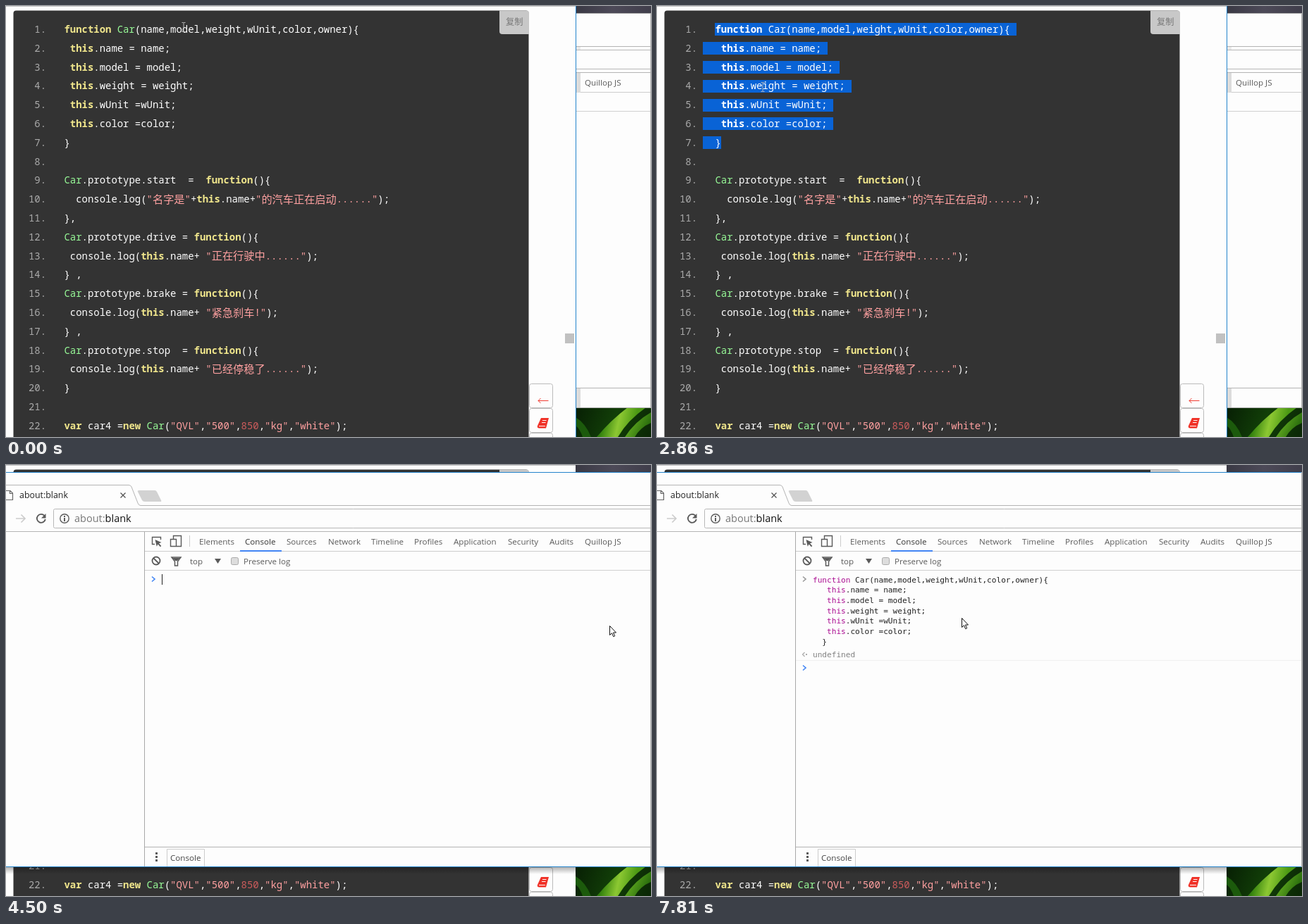
Write an HTML page with a canvas that moves like this. It is 915 by 612 pixels and loops after 8000 ms.

```html
<!DOCTYPE html>
<html lang="zh">
<head>
<meta charset="utf-8">
<title>Console paste</title>
<style>
html, body { margin: 0; width: 100%; height: 100%; overflow: hidden; background: #fff; }
canvas { display: block; }
</style>
</head>
<body>
<canvas id="stage" width="915" height="612"></canvas>
<script>
const ctx = document.getElementById('stage').getContext('2d');
const LOOP = 8000, SELECT = 1130, SELECTED = 2130, FRONT = 4500,
      MENU = 5330, PASTE = 6100, ENTER = 7250;
const CODE_X = 82.4, LINE = 26.8, CODE_SIZE = 13.96, CHAR = CODE_SIZE * .6;
const UI = '"Open Sans", "Noto Sans CJK SC", "Noto Sans CJK", sans-serif';
const CJK = '"Noto Sans CJK SC", "Noto Sans CJK", sans-serif';
const MONO = '"Noto Sans Mono", monospace';
const LOG = '"DejaVu Sans Mono", monospace';

const code = `function Car(name,model,weight,wUnit,color,owner){
 this.name = name;
 this.model = model;
 this.weight = weight;
 this.wUnit =wUnit;
 this.color =color;
}

Car.prototype.start  =  function(){
  console.log("名字是"+this.name+"的汽车正在启动......");
},
Car.prototype.drive = function(){
 console.log(this.name+ "正在行驶中......");
} ,
Car.prototype.brake = function(){
 console.log(this.name+ "紧急刹车!");
} ,
Car.prototype.stop  = function(){
 console.log(this.name+ "已经停稳了......");
}

var car4 =new Car("QVL","500",850,"kg","white");`.split('\n');

// Mouse moves: first step, last step, number of steps, destination
const moves = [
  [150, 540, 4, 87, 38],
  [1130, 1550, 4, 113, 159],
  [1690, 2130, 4, 118, 194],
  [2280, 2860, 5, 150, 115],
  [3140, 3420, 3, 718, 222],
  [3720, 4230, 5, 856, 228],
  [4640, 5050, 4, 382, 155],
  [5460, 5720, 3, 427, 211],
  [5840, 5970, 2, 432, 217]
];

function mouseAt(t) {
  let x = 252, y = 30;
  for (const [start, end, steps, toX, toY] of moves) {
    if (t < start) break;
    const gap = (end - start) / (steps - 1);
    const p = Math.min(steps, Math.floor((t - start) / gap + 1.001)) / steps;
    x += (toX - x) * p;
    y += (toY - y) * p;
  }
  return [x, y];
}

function box(color, x, y, w, h) {
  ctx.fillStyle = color;
  ctx.fillRect(x, y, w, h);
}

function path(d, fill, stroke, width = 1) {
  const p = new Path2D(d);
  if (fill) { ctx.fillStyle = fill; ctx.fill(p); }
  if (stroke) { ctx.strokeStyle = stroke; ctx.lineWidth = width; ctx.stroke(p); }
}

function round(x, y, w, h, r, fill, stroke) {
  ctx.beginPath();
  ctx.roundRect(x, y, w, h, r);
  if (fill) { ctx.fillStyle = fill; ctx.fill(); }
  if (stroke) { ctx.strokeStyle = stroke; ctx.lineWidth = 1; ctx.stroke(); }
}

function ring(x, y, r, color, width) {
  ctx.beginPath();
  ctx.arc(x, y, r, 0, 7);
  ctx.strokeStyle = color;
  ctx.lineWidth = width;
  ctx.stroke();
}

// Draws text and returns the x where it ends
function text(str, x, y, size, color, family = UI, weight = 400) {
  ctx.font = `${weight} ${size}px ${family}`;
  ctx.fillStyle = color;
  ctx.fillText(str, x, y);
  return x + ctx.measureText(str).width;
}

function textRight(str, x, y, ...style) {
  ctx.textAlign = 'right';
  text(str, x, y, ...style);
  ctx.textAlign = 'left';
}

function gradient(x0, y0, x1, y1, ...colors) {
  const g = ctx.createLinearGradient(x0, y0, x1, y1);
  colors.forEach((c, i) => g.addColorStop(i / (colors.length - 1), c));
  return g;
}

function codeLine(line, y, plain) {
  let x = CODE_X;
  for (const word of line.split(/("[^"]*"|\b(?:function|this|var|new|Car|850)\b)/)) {
    const key = /^(function|this|var|new)$/.test(word);
    const color = plain || (key ? '#f0e68c' : word === 'Car' ? '#98fb98' :
      word === '850' ? '#cd5c5c' : word[0] === '"' ? '#ffa0a0' : '#fff');
    for (const run of word.split(/([\u3000-\u9fff]+)/)) {
      x = run > '\u3000' ? text(run, x, y + .5, 15.2, color, CJK, 300)
                         : text(run, x, y, CODE_SIZE, color, MONO, key ? 700 : 500);
    }
  }
}

function selection(t) {
  const [x, y] = mouseAt(Math.min(t - 140, SELECTED));
  const last = Math.min(6, Math.floor((y - 19.6) / LINE));
  for (let i = 0; i <= last; i++) {
    const col = Math.max(0, Math.round((x - CODE_X) / CHAR));
    const end = i < last ? code[i].length + 1 : Math.min(code[i].length, col);
    const left = i ? 65 : 82, top = Math.ceil(24 + i * LINE);
    ctx.save();
    ctx.beginPath();
    ctx.rect(left, top, Math.ceil(CODE_X + end * CHAR) - left, 18);
    ctx.clip();
    box('#0963d6', 0, top, 742, 18);
    codeLine(code[i], 38 + i * LINE, '#fff');
    ctx.restore();
  }
}

function page(t) {
  box('#fdfdfd', 0, 0, 808, 612);
  round(10.5, 6.5, 731, 620, 4, '#333');
  code.forEach((line, i) => {
    const y = 38 + i * LINE;
    textRight(i + 1 + '.', 57, y, CODE_SIZE, '#aaa', MONO, 500);
    codeLine(line, y);
  });
  if (t >= SELECT) selection(t);
  round(700, 6.5, 42, 33.5, [0, 4, 0, 4], '#c8c8c8');
  text('复制', 709, 26.5, 12.2, '#777', CJK);
  for (const y of [536.5, 571.5, 606.5]) round(742.5, y, 33, 34, 3, '#fdfdfd', '#bbb');
  path('M769.5 560.5H755M758.5 557l-3.5 3.5 3.5 3.5', null, '#f03c32');
  path('M759 585H770L766 599.5H756Q753 599 754 596z', '#f03228');
  path('M761 588.5h5.5M760 591.5h5.5M756 596.5h9', null, '#fdfdfd');
  box('#c1c1c1', 793, 465, 13, 14);
  if (t < FRONT) {
    box('#eaeaea', 809, 58, 6, 4);
    box('#dcdcdc', 809, 95, 6, 28);
    box('#dcdcdc', 809, 543, 6, 27);
    box('#2484cc', 808, 0, 1, 612);
  }
  if (t >= 4100 && t < FRONT) {
    box('#fff', 764, 172, 80, 64);
    box('#ebebeb', 791, 173, 17, 63);
    box('#dfdfdf', 808, 173, 11, 63);
  }
}

function wallpaper() {
  box(gradient(808, 0, 915, 0, '#3a3944', '#4d4a58', '#403e4b'), 808, 0, 107, 11);
  ctx.save();
  ctx.beginPath();
  ctx.rect(808, 570, 107, 42);
  ctx.clip();
  box(gradient(808, 570, 915, 612, '#071f04', '#123f08', '#0a2605'), 808, 570, 107, 42);
  path('M808 584Q822 592 830 612H818Q814 600 808 596z', '#1c5a0c');
  path('M838 612Q858 588 882 570H908Q882 588 868 612z', gradient(846, 590, 890, 600, '#2f7d0c', '#8cc832', '#4c9a14'));
  path('M878 612Q892 590 915 577V592Q900 598 892 612z', gradient(880, 590, 908, 604, '#6cb424', '#286c0c'));
  ctx.restore();
}

function chevron(y, color) {
  path(`M207 ${y - 3.5}l4 3.5-4 3.5`, null, color, 1.6);
}

function caret(x, y) {
  box('#222', x, y, 1, 15);
}

function consoleBody(t) {
  const blue = '#4285f4';
  chevron(162, t < ENTER ? blue : '#999');
  if (t < PASTE) {
    if (t < 5050 || t >= MENU) caret(221, 155);
    return;
  }
  code.slice(0, 7).forEach((line, i) => {
    let x = 221;
    const indent = i ? '  ' : '';
    for (const word of (indent + line).split(/(function|this)/)) {
      const key = /^(function|this)$/.test(word);
      x = text(word, x, 166.5 + i * 14.7, 11.1, key ? '#aa0d91' : '#222', LOG);
    }
  });
  if (t < 6660) caret(241, 243);
  if (t < ENTER) return;
  path('M209.5 266l-3 3 3 3', null, '#aaa', 1.2);
  box('#aaa', 211, 268, 2, 2);
  text('undefined', 221, 273, 11.1, '#808080', LOG);
  box('#f0f0f0', 197, 277, 717, 1);
  chevron(288, blue);
  if (t < 7810) caret(221, 281);
}

function browser(t) {
  const edge = t < FRONT ? '#aaa' : '#2484cc', ink = '#5a5a5a';
  if (t >= FRONT) box(gradient(0, 571, 0, 581, 'rgba(0,0,0,.3)', 'rgba(0,0,0,0)'), 0, 571, 808, 10);
  box('#fdfdfd', 0, 10, 915, 561);
  box(edge, 0, 10, 915, 1);

  // Tab strip
  path('M0 28.5H174Q177 28.5 178 31L187 54Q188 57.5 191 57.5H915', null, '#b4b4b4');
  path('M0 36.5H6L9.5 40V49.5H0M5.5 36.5V40.5H9.5', null, '#666', 1.2);
  text('about:blank', 19, 47, 12.4, '#222');
  path('M162.5 39.5l7 7m0-7l-7 7', null, '#555', 1.3);
  path('M189 36H211Q213 36 214 38L220 50Q221 52 219 52H197Q194 52 193 50L187 38Q186 36 189 36z', '#d2d2d2');

  // Address bar
  path('M14 76H27M21.5 70.5l5.5 5.5-5.5 5.5', null, '#ccc', 1.7);
  path('M54.5 72A6 6 0 1 0 55.8 77', null, ink, 1.9);
  path('M56.5 69V75.5H50z', ink);
  round(67.5, 62.5, 860, 27, 2, null, '#b8b8b8');
  ring(83, 76, 6.2, ink, 1.4);
  box(ink, 82, 75, 2, 5);
  box(ink, 82, 72, 2, 2);
  text('blank', text('about:', 97, 81, 14.5, '#777'), 81, 14.5, '#111');
  box('#b4b4b4', 0, 94, 915, 1);

  // Developer tools toolbars
  box('#a8a8a8', 196, 95, 1, 475);
  path('M211 112.5H207.5V102.5H219.5V106', null, ink, 1.4);
  path('M211.5 106l9 4-3.5 1.3 3.3 3.6-1.4 1.3-3.4-3.7-1.7 3.2z', ink);
  path('M237.5 105V100.5H248.5V115.5H242M233.5 105.5H241.5V115.5H233.5z', null, ink, 1.4);
  box('#ccc', 260, 100, 1, 16);
  const tabs = { Elements: 274, Console: 339, Sources: 398, Network: 457, Timeline: 518, Profiles: 579,
    Application: 635, Security: 712, Audits: 771, 'Quillop JS': 821 };
  for (const name in tabs) text(name, tabs[name], 113, 11.6, name === 'Console' ? '#333' : ink);
  box('#ccc', 197, 122, 718, 1);
  box('#4285f4', 332, 121, 59, 2);
  ring(213, 136, 5.5, ink, 1.8);
  path('M209 132l8 8', null, ink, 1.8);
  path('M235 131H248L243.5 137V143H239.5V137z', null, ink, 1.5);
  path('M236 132H247L243 136H240z', ink);
  text('top', 261, 140.5, 11.6, ink);
  path('M296 133H305L300.5 140z', ink);
  round(319.5, 131.5, 10, 10, 2, '#ddd', '#aaa');
  text('Preserve log', 337, 140.5, 11.6, ink);
  box('#d0d0d0', 197, 149, 718, 1);
  consoleBody(t);

  // Drawer
  box('#b4b4b4', 197, 542, 718, 1);
  for (const y of [550, 555, 560]) box(ink, 212, y, 3, 3);
  round(228.5, 545.5, 53, 25, 0, null, '#ccc');
  text('Console', 233, 562, 11.6, '#444');
  box(edge, 0, 570, 915, 1);
  box('#b4b4b4', 914, 10, 1, 561);
}

function menu() {
  box('#8c8c8c', 387, 160, 220, 185);
  round(381.5, 155.5, 223, 188, 0, '#fff', '#b4b4b4');
  const items = [
    ['剪切', '(T)', 'Ctrl+X', 171], ['复制', '(C)', 'Ctrl+C', 195.5], ['粘贴', '(P)', 'Ctrl+V', 220],
    ['粘贴为纯文本', '', 'Ctrl+Shift+V', 244], ['全选', '(A)', 'Ctrl+A', 268.5],
    ['拼写检查', '(S)', '', 304.5], ['书写方向', '', '', 328.5]
  ];
  items.forEach(([label, hint, keys, y], i) => {
    const color = i < 2 ? '#a0a0a0' : '#111';
    text(hint, text(label, 418, y + 4.5, 12.2, color, CJK), y + 4.5, 13, color);
    textRight(keys, 579, y + 4.5, 13.3, '#999');
    if (!keys) path(`M590 ${y - 4}l5.5 4-5.5 4z`, '#333');
  });
  box('#e4e4e4', 383, 285, 221, 1);
}

function pointer(t) {
  const [x, y] = mouseAt(t).map(Math.round);
  if (t >= FRONT || x > 742) {
    path(`M${x + .5} ${y + .5}v13l3-2.8 2.2 5 2-.9-2.2-4.8h4z`, '#fff', '#111');
  } else {
    path(`M${x - 2.5} ${y - 6.5}h2l.5 .5 .5-.5h2M${x} ${y - 6}V${y + 6}M${x - 2.5} ${y + 6.5}h2l.5-.5 .5 .5h2`,
      null, '#b8b8b8');
  }
}

function draw(now) {
  const t = now % LOOP;
  box('#fdfdfd', 0, 0, 915, 612);
  wallpaper();
  for (const layer of t < FRONT ? [browser, page] : [page, browser]) layer(t);
  box('#c4c4c4', 0, 0, 808, 1);
  if (t >= MENU && t < PASTE) menu();
  pointer(t);
  requestAnimationFrame(draw);
}
requestAnimationFrame(draw);
</script>
</body>
</html>
```
